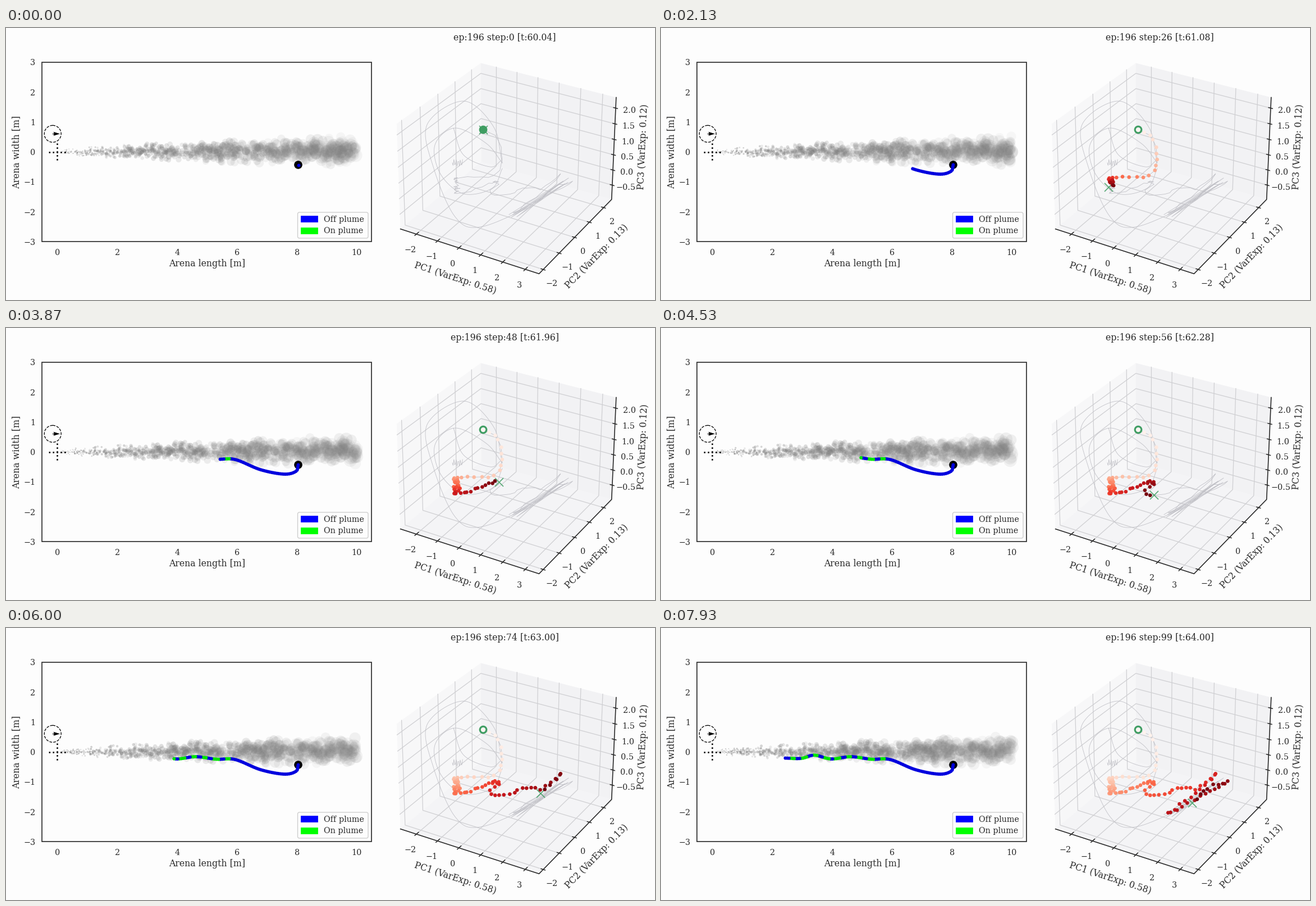
A matplotlib script that plays this animation: 1156 px wide and 484 px high, repeating every 8 s.

```python
import numpy as np
import matplotlib.pyplot as plt
from matplotlib.animation import FuncAnimation
from matplotlib.patches import Circle, FancyBboxPatch, Polygon, Rectangle

W, H, DPI = 1156, 484, 64
PT = 72 / DPI                      # points per pixel
FRAMES, LOOP, STEPS = 121, 8000, 100
INK, PAPER, GREEN = "#262626", "#fdfdfd", "#3f9d62"
LABEL, TICK = 15.7, 14.4

plt.rcParams["font.family"] = "DejaVu Serif"
fig = plt.figure(figsize=(W / DPI, H / DPI), dpi=DPI, facecolor=PAPER)
ax = fig.add_axes([0, 0, 1, 1])
ax.set(xlim=(0, W), ylim=(H, 0))
ax.axis("off")
rng = np.random.default_rng(196)


def text(x, y, s, size=TICK, ha="center", rot=0):
    return ax.text(x, y, s, fontsize=size * PT, color=INK, ha=ha, rotation=rot,
                   va="center_baseline", rotation_mode="anchor", zorder=9)


def line(pts, color=INK, width=1.6, z=2, **kw):
    x, y = np.transpose(pts)
    ax.plot(x, y, color=color, lw=width * PT, zorder=z, **kw)


def dots(z):
    return ax.scatter([], [], linewidths=0, zorder=z)


def area(r):
    return (2 * np.asarray(r) * PT) ** 2


def spline(*pts, n=16):
    """Catmull-Rom curve through the points."""
    p = np.array(pts, float)
    p = np.vstack([2 * p[0] - p[1], p, 2 * p[-1] - p[-2]])
    t = np.linspace(0, 1, n)[:, None]
    return np.vstack([
        0.5 * (2 * b + (c - a) * t + (2 * a - 5 * b + 4 * c - d) * t**2
               + (3 * b - a - 3 * c + d) * t**3)
        for a, b, c, d in zip(p, p[1:], p[2:], p[3:])])


def glide(n, *pts):
    """n positions at constant speed along the curve through the points."""
    p = spline(*pts)
    s = np.r_[0, np.cumsum(np.hypot(*np.diff(p, axis=0).T))]
    at = np.linspace(0, s[-1], n)
    return np.stack([np.interp(at, s, c) for c in p.T], 1)


def num(v, digits=0):
    return f"{v:.{digits}f}".replace("-", "\u2212")


# ---- arena ----
def arena(x, y):
    return np.stack([91.1 + 53.35 * x, 220.6 - 53.25 * y], axis=-1)


corner, size = arena(-0.5, 3), arena(10.5, -3) - arena(-0.5, 3)
ax.add_patch(Rectangle(corner, *size, fill=False, ec=INK, lw=1.65 * PT, zorder=5))
for v in range(0, 11, 2):
    text(arena(v, 0)[0] + 0.3, 399, num(v))
for v in range(-3, 4):
    text(52.3, arena(0, v)[1], num(v), ha="right")
text(358.2, 418, "Arena length [m]", LABEL)
text(16.5, 220.5, "Arena width [m]", LABEL, rot=90)

cx, cy = arena(0, 0)
for dx, dy in ((15.5, 0), (0, 15.5)):
    line([(cx - dx, cy - dy), (cx + dx, cy + dy)], "black", 2.6, 4, ls=":")
ax.add_patch(Circle((83.2, 188.3), 15, fill=False, ec="black", lw=1.3 * PT,
                    ls=(0, (3.7, 1.6)), zorder=4))
line([(83, 188.3), (88, 188.3)], "black", 1.3, 4)
ax.add_patch(Polygon([(84.5, 184.8), (96, 188.3), (84.5, 191.8), (86, 188.3)],
                     fc="black", lw=0, zorder=4))

ax.add_patch(FancyBboxPatch((519.5, 328), 125.5, 46, fc=PAPER, ec="#cccccc",
                            boxstyle="round,pad=0,rounding_size=3",
                            lw=1.3 * PT, zorder=7))
for y, color, name in ((339.3, "blue", "Off plume"), (360, "lime", "On plume")):
    ax.add_patch(Rectangle((525.3, y - 5.3), 29.2, 10.8, fc=color, ec=color,
                           lw=0.8 * PT, zorder=8))
    text(565.6, y, name, ha="left")

# ---- plume: puffs drift downwind, widen and fade ----
PUFFS, DRIFT = 1200, 0.02
birth = rng.uniform(-2, 10, PUFFS)
spread = np.clip(rng.normal(0, 1, PUFFS), -2.3, 2.3)
shade = rng.uniform(0.4, 1, PUFFS)
growth = rng.uniform(0.75, 1.15, PUFFS)
puffs = dots(3)


def draw_plume(step):
    x = birth + DRIFT * step
    on = (x > 0.15) & (x < 10.02)
    x = x[on]
    y = 0.066 * np.sqrt(x) * spread[on] + 0.004 * x
    rgba = np.full((x.size, 4), 0.5)
    rgba[:, 3] = (0.42 * np.exp(-x / 5.5) + 0.05) * shade[on]
    puffs.set_offsets(arena(x, y))
    puffs.set_sizes(area((0.6 + x) * growth[on]))
    puffs.set_facecolors(rgba)


# ---- agent: constant speed, scent met at regular intervals in the plume ----
route = glide(STEPS, (520.5, 243.5), (516.5, 255), (495, 260), (453, 252),
              (408, 234), (375, 233.5), (338, 229), (303, 233), (273, 226.3),
              (250, 232), (221.5, 231.5))
rx = route[:, 0]
scented = (rx < 401) & (np.cos(np.pi * (rx - 394) / 10) > -0.15)
route_colors = np.where(scented[:, None], (0, 0.9, 0, 1), (0, 0, 0.87, 1))
ax.add_patch(Circle(route[0], 7.3, fc="black", lw=0, zorder=5.5))
trail = dots(6)


# ---- state-space box: perspective of the unit cube, solved from its corners ----
CORNERS = {(0, 0, 0): (846.3, 238), (0, 0, 1): (845.5, 62.5),
           (0, 1, 1): (696, 170), (0, 1, 0): (703, 358),
           (1, 1, 0): (949, 437.5), (1, 0, 0): (1079, 304.5),
           (1, 0, 1): (1087, 124)}


def solve_view():
    rows, rhs = [], []
    for cube, (x, y) in CORNERS.items():
        p, o = np.array([*cube, 1.0]), np.zeros(4)
        rows += [np.r_[p, o, -x * p[:3]], np.r_[o, p, -y * p[:3]]]
        rhs += [x, y]
    m = np.linalg.lstsq(np.array(rows), np.array(rhs), rcond=None)[0]
    return np.r_[m, 1].reshape(3, 4)


VIEW = solve_view()


def project(*pts):
    q = np.column_stack([np.array(pts, float), np.ones(len(pts))]) @ VIEW.T
    return q[:, :2] / q[:, 2:]


def grid(*pts):
    line(project(*pts), "#cfcfd2", 1.25, 1)


def tick(a, b):
    line(project(a, b), width=1.5)


for color, a, b in (("#f7f7f8", (0, 1, 0), (0, 0, 1)),
                    ("#f2f2f4", (1, 0, 0), (0, 0, 1)),
                    ("#f4f4f6", (1, 0, 0), (0, 1, 0))):
    pane = project((0, 0, 0), a, np.add(a, b), b)
    ax.add_patch(Polygon(pane, fc=color, lw=0, zorder=0))

for i in range(6):
    u, w = 0.12 + 0.157 * i, 0.145 + 0.1508 * i
    grid((u, 1, 0), (u, 0, 0), (u, 0, 1))
    tick((u, 0.975, 0), (u, 1.018, 0))
    x, y = project((u, 1, 0))[0]
    text(x - 10.8, y + 27, num(i - 2))
    grid((0, 1, w), (0, 0, w), (1, 0, w))
    tick((0.985, 0, w), (1.013, 0, w))
    x, y = project((1, 0, w))[0]
    text(x + 24, y + 3, num(-0.5 + 0.5 * i, 1))
for i in range(5):
    v = 0.947 - 0.207 * i
    grid((1, v, 0), (0, v, 0), (0, v, 1))
    tick((0.985, v, 0), (1.013, v, 0))
    x, y = project((1, v, 0))[0]
    text(x + 15, y + 23.5, num(i - 2))
line(project((0, 1, 0), (1, 1, 0), (1, 0, 0), (1, 0, 1)))
text(800.5, 443, "PC1 (VarExp: 0.58)", LABEL, rot=-17.9)
text(1051, 405.5, "PC2 (VarExp: 0.13)", LABEL, rot=45.6)
text(1132.5, 211, "PC3 (VarExp: 0.12)", LABEL, rot=87.5)
title = text(888.5, 16, "", LABEL)

# ---- state trajectory: one position per step, phase by phase ----
k = np.arange(19)
state = np.vstack([
    glide(16, (850, 181), (876, 195), (884, 240), (867, 265), (836, 265), (799, 269)),
    np.stack([802 + 4.5 * np.sin(2.4 * k - 0.6), 266 + 1.5 * k], 1),
    glide(14, (797, 292), (806, 294), (833, 288), (878, 271)),
    glide(16, (868, 273), (880, 277), (862, 290), (870, 298), (901, 295),
          (925, 284), (944, 283)),
    glide(20, (950, 288), (992, 258), (945, 299), (901, 331), (950, 307)),
    glide(15, (962, 300), (1011, 274), (975, 285), (946, 310))])
state[1:] += rng.normal(0, 1.2, (STEPS - 1, 2))


def trace(pts):
    line(pts, "#c0c0c6", 0.8, 2)


trace(state)
trace(spline((884, 240), (868, 175), (815, 130), (750, 172), (762, 250),
             (800, 336), (845, 354), (940, 316)))
trace(spline((884, 240), (855, 205), (800, 178), (764, 208), (774, 260),
             (815, 295), (866, 285), (884, 250)))
trace(spline((797, 178), (815, 226), (862, 247), (882, 236)))
j = np.arange(14)
trace(np.stack([795 + 1.4 * j, 240 + 6 * np.sin(2.3 * j)], 1))
ends = np.where(np.arange(8)[:, None] % 2, (900, 336), (998, 272))
trace(ends + rng.uniform(-1, 1, (8, 2)) * (10, 6))

ring = Circle(state[0], 5.8, fc="none", ec=GREEN, lw=3.1 * PT, zorder=4)
ax.add_patch(ring)
cross = ax.scatter([0], [0], marker="x", s=area(7.5), c=GREEN, alpha=0.85,
                   linewidths=1.7 * PT, zorder=3)
history = dots(3.5)
reds = plt.get_cmap("Reds")


def draw(n):
    step = min(n * (STEPS - 1) // (FRAMES - 2), STEPS - 1)
    draw_plume(step)
    trail.set_offsets(route[:step + 1])
    trail.set_sizes(area([3]))
    trail.set_facecolors(route_colors[:step + 1])
    history.set_offsets(state[:step])
    history.set_sizes(area([3.3]))
    history.set_facecolors(reds(np.arange(step) / max(step, 1)))
    cross.set_offsets(state[step:step + 1])
    ring.set_facecolor("none" if step else GREEN)
    title.set_text(f"ep:196 step:{step} [t:{60.04 + 0.04 * step:.2f}]")
    return puffs, trail, history, cross, ring, title


anim = FuncAnimation(fig, draw, frames=FRAMES, interval=LOOP / FRAMES,
                     init_func=lambda: draw(0), repeat=True, repeat_delay=0)
plt.show()
```
